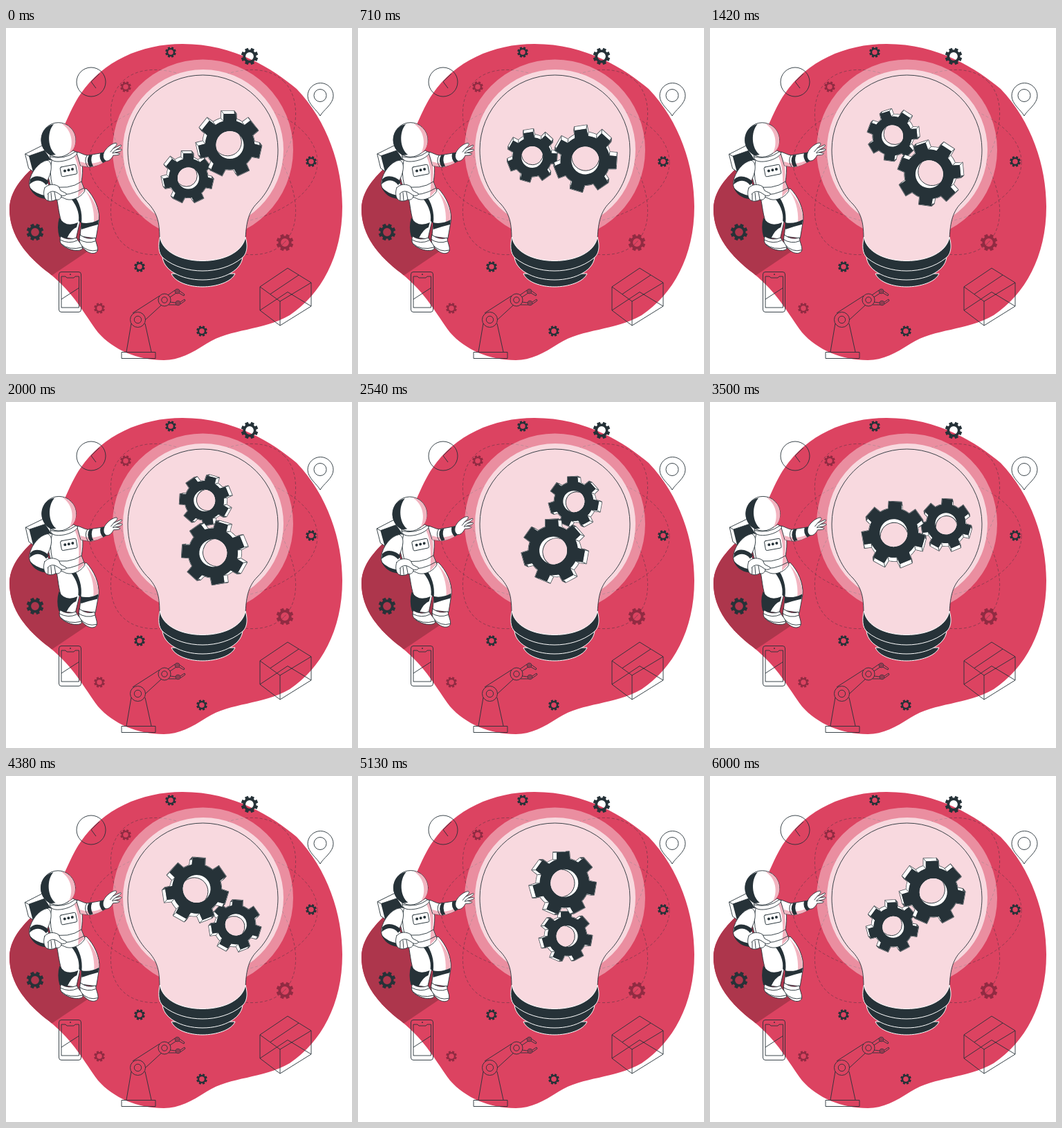
Recreate the animation shown at these times as an HTML page. Size 500 by 500 pixels, loop 6.04 s.

```html
<!DOCTYPE html>
<html lang="en">
<head>
<meta charset="utf-8">
<title>Idea workshop</title>
<style>
  html, body { margin: 0; width: 100%; height: 100%; overflow: hidden; background: #fff; }
  svg { display: block; width: 100vw; height: 100vh; }
  .line { fill: none; stroke: #263238; stroke-width: .9; stroke-linejoin: round; }
  .orbit { fill: none; stroke: #263238; stroke-width: .8; stroke-dasharray: 4 3; opacity: .5; }
  .suit { fill: #fff; stroke: #263238; stroke-width: .9; stroke-linejoin: round; stroke-linecap: round; }
  .dark { fill: #263238; stroke: none; }
  .shade { fill: #f2b4c0; stroke: none; }
  .crease { fill: none; }
  .band { fill: #263238; stroke: #fff; stroke-width: 1; }
</style>
</head>
<body>
<svg viewBox="0 0 500 500">
  <defs>
    <path id="blob" d="M5 262C5 228 36 205 60 182C80 160 90 120 108 95C140 48 195 23 255 23C330 23 385 59 420 88C465 135 486 200 486 258C486 330 455 385 410 415C370 438 325 434 290 456C268 470 250 480 228 480C190 480 155 465 133 440C112 412 100 385 62 354C30 330 5 300 5 262Z"/>
    <clipPath id="inBlob"><use href="#blob"/></clipPath>
  </defs>
  <use href="#blob" fill="#dc4361"/>
  <path clip-path="url(#inBlob)" fill="#ad364c" d="M0 190H66L122 320L67 357L0 380Z"/>
  <g id="orbits" class="orbit"></g>
  <g id="smallGears"></g>

  <!-- bulb -->
  <circle cx="284.5" cy="176" r="130.5" fill="#fff" opacity=".4"/>
  <circle cx="285" cy="176" r="116" fill="#f8d9df"/>
  <g class="band">
    <path d="M239 355C244 367 264 374 284 374S326 367 331 355Z"/>
    <path d="M226 329C226 349 252 364 284 364S342 349 342 329Z"/>
  </g>
  <path class="line" style="fill:#f8d9df" d="M222 306C222 284 220 270 207 255C188 237 176 208 176 176A108.500 108 0 0 1 393 176C393 208 381 235 363 253C349 267 347 285 346 306C338 348 230 348 222 306Z"/>
  <path class="band" d="M222.500 302C230 348 338 348 346 302C349 312 350 326 340 333C310 357 258 357 228 333C219 326 220 312 222.500 302Z"/>
  <g id="pair"></g>

  <!-- outlined objects -->
  <g id="outlines" class="line">
    <path d="M135 66L123 77.500L130 87"/>
    <path d="M454 127C450 119 436 110 436 98a18.500 18.500 0 0 1 37 0C473 110 458 119 454 127Z"/>
    <rect x="76.500" y="352.500" width="32" height="58" rx="3.500"/>
    <path d="M80 359H86L88 361H98L100 359H105.500V404H80ZM80 392L105.500 375.500"/>
    <path d="M407 347L441 368V402L396 430L367 408V374ZM367 374L396 395L441 368M396 395V430M382 384.500L423 357M367 408L407 381.500L441 402"/>
    <path d="M167 468.500H216V477.500H167ZM174 468L181 427M201 427L210 468M183 412L222 387M201 422L225 400"/>
    <path d="M234 386L244 379M237 389L246 383M237 396L245 397M235 400L246 400M251 380L258 385L257 387L250 383M252 396L258 392L259 394L252 399"/>
  </g>

  <g id="astronaut" class="suit">
    <!-- backpack -->
    <path d="M28 182L52 170L62 178L66 192L40 208L33 203Z"/>
    <path class="dark" d="M33 185L56 177L66 192L39 208Z"/>
    <path class="crease" d="M28 182L33 185L56 177"/>
    <!-- far leg -->
    <path d="M92 243L116 232C127 243 136 262 134.500 278L130 304L107 301L109 282Z"/>
    <path class="shade" d="M114 234C126 246 135 262 134 277L127 280C128 263 123 246 114 234Z"/>
    <path class="dark" d="M108 281Q121 284 134 277L133 284Q121 287 109 291Z"/>
    <path d="M107 299Q118 307 129 303C129 309 133 315 132.500 321C131 327 122 327 116 322S104 312 107 299Z"/>
    <path class="crease" d="M105 305Q117 313 129 308M108 313Q118 325 132 321"/>
    <!-- near leg -->
    <path d="M72 240C76 256 76 272 82 284L78 302L101 305L107 279C108 265 103 253 94 241Z"/>
    <path class="dark" d="M90 242L98 241C106 252 111 266 109 282L105 279Q107 260 90 242Z"/>
    <path class="dark" d="M77 274Q86 289 104 281L102 288Q94 291 88 304L77 302Q73 288 77 274Z"/>
    <path d="M79 301Q90 308 102 303C104 309 111 313 110.500 319C107 323 96 322 88 318S76 310 79 301Z"/>
    <path class="crease" d="M78 306Q91 313 103 307M80 312Q91 322 110 317"/>
    <!-- torso -->
    <path d="M61 190C76 194 94 190 104 179C111 190 112 205 109 222L114 235C110 244 94 252 84 246L72 241L65 229C60 215 58 200 61 190Z"/>
    <path class="shade" d="M103 181Q111 198 108 222L113 235L104 244Q108 204 99 186Z"/>
    <path class="crease" d="M65 228Q90 235 109 222M72 240Q92 244 113 231M66 192Q62 208 67 228"/>
    <rect x="79" y="199" width="23" height="14" rx="2" transform="rotate(-11 90.500 206)"/>
    <!-- reaching arm -->
    <path d="M102 179C108 180 113 184 118 184L142 180L145 192C137 196 130 200 121 201L108 199Z"/>
    <path class="shade" d="M107 193Q126 200 144 189L144.500 192Q133 200 121 201L108 199Z"/>
    <path class="dark" d="M120 184L125 183Q121 191 126 199.500L121 201Q115 192 120 184ZM136 181L142 180Q140 187 145 192L140 195Q134 189 136 181Z"/>
    <path class="crease" d="M117 184Q112 192 118 200.500"/>
    <path d="M141 181C143 175 151 168 157 166.500C161 166 162 168 155 174L166 169C168 170 166 172 159 176L166 175C169 176 167 178 158 180L163 181C166 182 164 184 155 184C152 190 148 193 144 192C140 189 140 185 141 181Z"/>
    <path class="crease" d="M155 174L151 179M159 176L154 180M158 180L154 181"/>
    <!-- near arm -->
    <path d="M60 191C47 193 36 209 34 221C32 232 38 240 57 245L64 230L59 222C64 213 70 195 60 191Z"/>
    <path class="dark" d="M35 219C41 211 54 214 62 222L58 227C52 219 43 218 34 226Z"/>
    <path class="dark" d="M34 230Q40 245 57 247V242Q43 240 34 230Z"/>
    <path d="M56 231C61 225 70 225 76 229L79 235L87 239C88 242 84 243 80 242C80 247 76 249 72 248C67 251 60 251 57 247C54 243 54 236 56 231Z"/>
    <path class="crease" d="M61 249V240M66 249L65 238M72 248L70 237M60 240Q66 233 74 238L80 242"/>
    <!-- helmet -->
    <path d="M64 181Q82 190 97 177L103 180C102 186 88 193 75 193C67 193 62 190 64 181Z"/>
    <path class="crease" d="M64 186Q84 191 100 179"/>
    <circle cx="75.700" cy="161.500" r="24.800"/>
    <path class="shade" d="M80 138C104 142 106 173 91 181C98 168 96 148 80 138Z"/>
    <path class="dark" d="M69 139C48 142 43 174 65 184L72 183C60 174 59 150 69 139Z"/>
  </g>
</svg>
<script>
  const LOOP = 6040, SWAY = LOOP / 4;
  const DARK = '#263238', MAROON = '#902b42', GLASS = '#f8d9df';
  const $ = id => document.getElementById(id);

  function add(parent, tag, attrs) {
    const el = document.createElementNS('http://www.w3.org/2000/svg', tag);
    for (const k in attrs) el.setAttribute(k, attrs[k]);
    parent.append(el);
    return el;
  }
  const ring = (cx, cy, r) => add($('outlines'), 'circle', { cx, cy, r });
  const poly = pts => 'M' + pts.map(p => p.map(v => v.toFixed(2)).join(' ')).join('L') + 'Z';
  const disc = r => `M${-r} 0a${r} ${r} 0 1 0 ${2 * r} 0a${r} ${r} 0 1 0 ${-2 * r} 0Z`;

  // each tooth gives four corners, then points along the root
  function gearPoints(teeth, tip, root, turn = 0) {
    const pts = [], step = 2 * Math.PI / teeth, rootSteps = 5;
    for (let i = 0; i < teeth; i++) {
      const mid = (i + turn) * step - Math.PI / 2;
      const put = (a, r) => pts.push([r * Math.cos(mid + a), r * Math.sin(mid + a)]);
      put(-.27, root); put(-.2, tip); put(.2, tip); put(.27, root);
      for (let k = 1; k < rootSteps; k++) put(.27 + (step - .54) * k / rootSteps, root);
    }
    return pts;
  }

  function flatGear(x, y, r, fill) {
    const d = poly(gearPoints(8, r, r * .76, .5)) + disc(r * .47);
    add($('smallGears'), 'path', { d, fill, 'fill-rule': 'evenodd', transform: `translate(${x} ${y})` });
  }

  // dark front face over a white body that reaches back by (dx, dy)
  function solidGear(id, x, y, tip, hole, dx, dy) {
    const g = add($('pair'), 'g', { transform: `translate(${x} ${y})` });
    const pts = gearPoints(7, tip, tip * .775);
    const back = pts.map(([px, py]) => [px + dx, py + dy]);
    const sides = pts.map((p, i) => {
      const j = (i + 1) % pts.length;
      return poly([p, pts[j], back[j], back[i]]);
    }).join('');
    const edges = pts.map((p, i) => i % 8 < 4 ? `M${p}L${back[i]}` : '').join('');
    for (const [color, width] of [[DARK, 1.6], ['#fff', .3]])
      add(g, 'path', { d: sides, fill: color, stroke: color, 'stroke-width': width, 'stroke-linejoin': 'round' });
    add(g, 'path', { d: edges, stroke: DARK, 'stroke-width': .8 });
    add(g, 'path', { d: poly(pts), fill: DARK });
    add(g, 'circle', { r: hole, fill: '#fff' });
    add(add(g, 'clipPath', { id }), 'circle', { r: hole });
    const well = add(g, 'g', { 'clip-path': `url(#${id})` });
    add(well, 'circle', { cx: dx, cy: dy, r: hole, fill: GLASS, stroke: DARK, 'stroke-width': .9 });
  }

  for (const tilt of [0, 45, -45])
    add($('orbits'), 'ellipse', { rx: 165, ry: 92, transform: `translate(285 194) rotate(${tilt})` });

  const SMALL = 8, MEDIUM = 12.5;
  for (const [x, y] of [[238, 35], [441, 193], [193, 345], [283, 438]]) flatGear(x, y, SMALL, DARK);
  for (const [x, y] of [[352, 41], [42, 295]]) flatGear(x, y, MEDIUM, DARK);
  for (const [x, y] of [[173, 85], [135, 405]]) flatGear(x, y, SMALL, MAROON);
  flatGear(403, 310, MEDIUM, MAROON);

  solidGear('wellA', 263.5, 217, 36.5, 15.5, -2.7, -3.3);
  solidGear('wellB', 323.5, 169, 46, 20, -3.2, -4.2);

  // clock, pin, phone camera
  ring(123, 78, 21);
  ring(454, 97.5, 9);
  ring(93, 356, .6);
  // robot arm joints
  for (const [x, y, r] of [[190.5, 421.5, 11], [229, 393, 9], [247.5, 380.5, 3.3], [248.5, 397.5, 3.3]]) {
    ring(x, y, r);
    ring(x, y, r * .47);
  }
  // chest buttons
  for (let i = 0; i < 3; i++)
    add($('astronaut'), 'circle', { class: 'dark', cx: 85 + 5.5 * i, cy: 206.5 - 1.2 * i, r: 2 });

  // triangle wave: 0, 1, 0, -1, 0
  const swing = u => u < .25 ? 4 * u : u < .75 ? 2 - 4 * u : 4 * u - 4;

  const start = performance.now();
  function draw() {
    const t = performance.now() - start;
    $('pair').setAttribute('transform', `rotate(${t % LOOP / LOOP * 360} 297 186.5)`);
    $('astronaut').setAttribute('transform', `rotate(${swing(t % SWAY / SWAY)} 98 231)`);
    requestAnimationFrame(draw);
  }
  draw();
</script>
</body>
</html>
```
